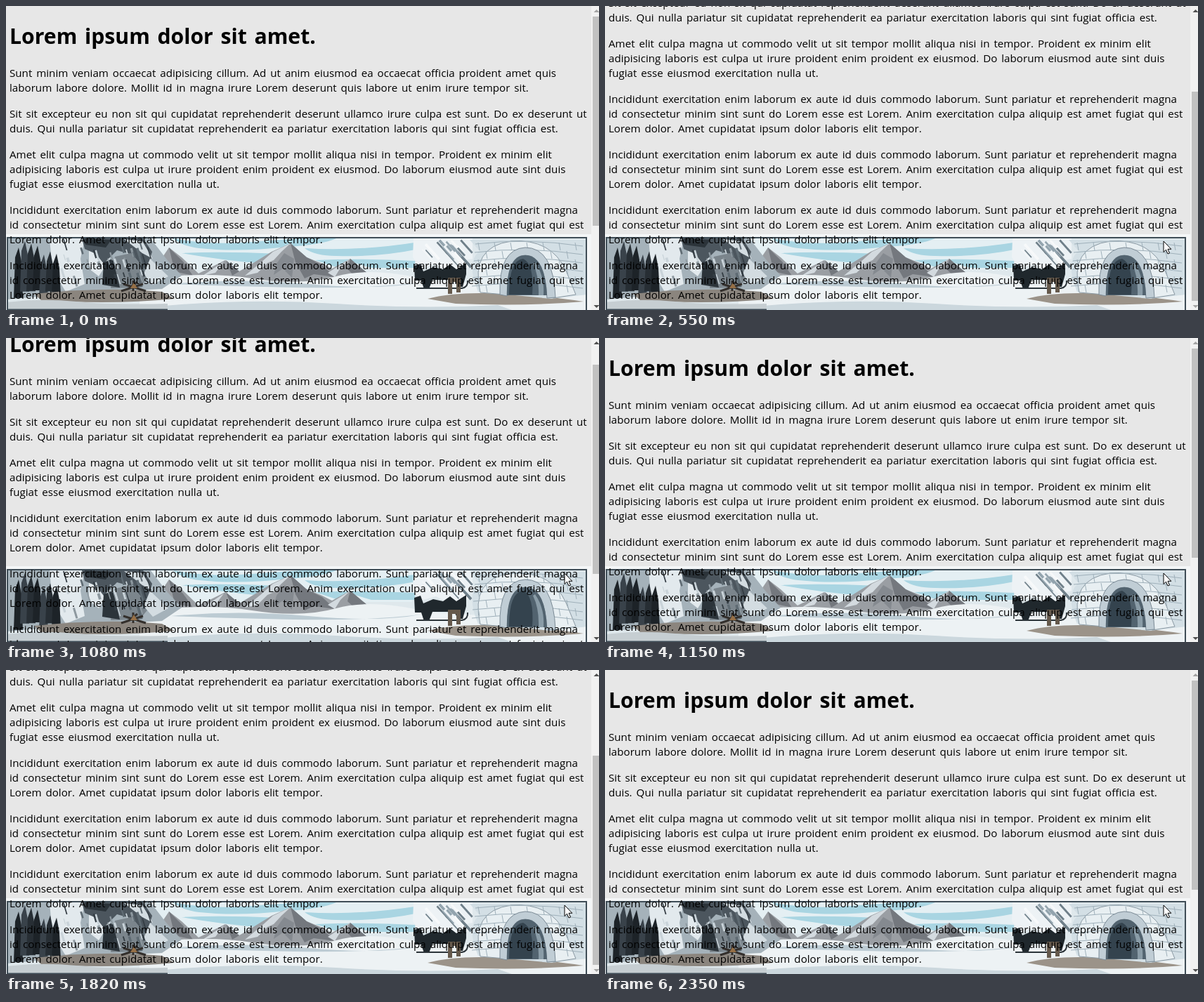
Write an HTML page that moves like this. It is 844 by 433 pixels and loops after 2620 ms.

```html
<!DOCTYPE html>
<html lang="la">
<head>
<meta charset="utf-8">
<title>Scrolling page</title>
<style>
html, body { margin: 0; width: 100%; height: 100%; overflow: hidden; background: #e7e7e7; }
#stage { position: relative; width: 844px; height: 433px; overflow: hidden; }
#stage > * { position: absolute; }
#scene { left: 0; top: 325px; }
#page { left: 5px; top: 0; color: #000; white-space: nowrap; }
h1 { margin: 21px 0; font: bold 30.2px/43px "Open Sans", sans-serif; word-spacing: 2.8px; }
p { margin: 0 0 16px; font: 15.15px/21px "Open Sans", sans-serif; word-spacing: 2px; }
#bar { left: 833px; top: 0; width: 11px; height: 433px; background: #f1f1f1; }
#thumb { left: 835px; top: 15px; width: 9px; height: 298px; background: #c1c1c1; }
#arrows { left: 833px; top: 0; }
#cursor { left: 794px; top: 334px; }
</style>
</head>
<body>
<div id="stage">
  <svg id="scene" width="833" height="108" viewBox="0 325 833 108">
    <path fill="#f4f6f7" d="M0 325H833V433H0Z"/>
    <path fill="#dfe8ec" d="M1 329H827V433H1Z"/>
    <!-- sky -->
    <path fill="#e4eff3" d="M205 330H590L578 376H230Z"/>
    <g fill="#a9d5e2">
      <path d="M238 331Q290 341 350 336L420 331H470Q450 340 400 343Q330 351 275 345Q250 342 238 331Z"/>
      <path d="M425 345Q500 350 588 336V346Q530 358 470 356Q440 356 425 345Z"/>
      <path d="M250 352Q310 349 385 353L365 367Q300 361 250 352Z"/>
      <path d="M440 362Q510 359 582 363V373H520L490 364L470 372Z"/>
    </g>
    <!-- mountains -->
    <path fill="#9a9ea3" d="M205 384L232 344L250 358L274 381L312 362L332 378L352 366L378 350L405 338L428 358L448 366L464 374L490 360L522 388L560 398H205Z"/>
    <path fill="#74787e" d="M405 338L428 358L450 369L468 386L438 382L425 388L412 365ZM490 360L526 390L500 388L486 375ZM313 362L332 378L322 384ZM232 344L252 364L266 384L240 378Z"/>
    <path fill="#d3dadf" d="M405 338L392 350L381 362L372 366L358 380L340 384L362 366L380 350ZM490 360L476 373L468 386L458 380ZM310 364L298 380L280 384Z"/>
    <path fill="#858a90" d="M396 352L385 367L381 383L394 374L407 387L410 360Z"/>
    <!-- ground -->
    <path fill="#edf2f4" d="M190 390Q280 377 350 388T470 385T600 390L720 398L827 404V433H190Z"/>
    <path fill="#bccbd3" d="M235 396Q330 387 430 396T590 394Q510 403 410 401T235 396Z"/>
    <path fill="#cbd7dd" d="M225 427Q350 416 470 424T700 426L720 433H225Z"/>
    <path fill="#9b9389" d="M600 417Q640 406 710 410T822 421Q740 428 640 424Z"/>
    <!-- cliffs and cave -->
    <path fill="#a5b2ba" d="M1 330H205L228 360L250 384L222 403L90 410L1 418Z"/>
    <path fill="#e2e9ed" d="M62 331H112L106 360L112 396L85 407L66 376ZM118 345L142 335L148 360L132 385L118 374Z"/>
    <path fill="#4c565e" d="M108 331H195L208 350L200 378L180 354L158 348L139 367L128 353L112 346Z"/>
    <path fill="#7b858c" d="M155 357L178 352L205 383L190 401L149 402Z"/>
    <path fill="#d3dce1" d="M168 332L194 335L209 360L194 352ZM205 360L231 385L209 397L196 382Z"/>
    <path fill="#2c343a" d="M112 331L150 333L142 344L113 340ZM139 365L152 360L162 401L137 397Z"/>
    <g id="cliffs"></g>
    <g id="spikes"></g>
    <path fill="#8b857e" d="M40 410Q145 399 222 407L240 417Q150 426 50 419Z"/>
    <path fill="#c6ced2" d="M1 422Q50 416 100 421T230 424V433H1Z"/>
    <path fill="none" stroke="#332f2c" stroke-width="3" d="M164 406L195 396M167 396L199 406M181 391V406M174 403L187 393"/>
    <path fill="#967047" d="M177 402L182 394L187 402Z"/>
    <!-- snowy tree and sled -->
    <path fill="#edf2f5" d="M580 331H664V360L644 364L658 372L630 378L612 368L590 374L579 358Z"/>
    <g id="branches"></g>
    <path fill="#20282d" d="M581 370L590 367L594 378L608 372L622 375L632 368L641 375L655 366V382L650 400H643L638 390H607L602 403H595L591 391L582 391Z"/>
    <path fill="none" stroke="#2c3439" stroke-width="2" d="M584 402H649Q658 400 657 391"/>
    <path fill="#65594c" d="M629 387H647V408H641V393H635V410H629Z"/>
    <!-- igloo -->
    <path fill="#d3dfe5" d="M660 333H827V411L776 417L672 407Q654 365 674 349Z"/>
    <path fill="#e8eff2" stroke="#8998a2" d="M675 408Q660 343 719 335Q776 331 797 377L811 411L779 416L768 371Q747 339 719 363L710 411Z"/>
    <g id="bricks" fill="none" stroke="#9fb0ba"></g>
    <path fill="#c0cdd5" stroke="#7c8b96" d="M703 411Q701 346 739 344Q779 344 782 415L770 416Q767 355 739 355Q714 355 713 413Z"/>
    <path fill="#52636f" d="M713 412Q712 355 739 355Q767 355 770 412Z"/>
    <path fill="#34434e" d="M716 411Q716 362 736 360Q752 367 749 411Z"/>
    <path fill="#8a9ca7" d="M753 365Q767 385 765 412H758Q759 385 750 367Z"/>
    <path fill="none" stroke="#3f4d57" stroke-width="2" d="M2 433V330H826V433M1 432.5H230"/>
  </svg>

  <div id="page">
    <h1>Lorem ipsum dolor sit amet.</h1>
    <p>Sunt minim veniam occaecat adipisicing cillum. Ad ut anim eiusmod ea occaecat officia proident amet quis<br>laborum labore dolore. Mollit id in magna irure Lorem deserunt quis labore ut enim irure tempor sit.</p>
    <p>Sit sit excepteur eu non sit qui cupidatat reprehenderit deserunt ullamco irure culpa est sunt. Do ex deserunt ut<br>duis. Qui nulla pariatur sit cupidatat reprehenderit ea pariatur exercitation laboris qui sint fugiat officia est.</p>
    <p>Amet elit culpa magna ut commodo velit ut sit tempor mollit aliqua nisi in tempor. Proident ex minim elit<br>adipisicing laboris est culpa ut irure proident enim proident ex eiusmod. Do laborum eiusmod aute sint duis<br>fugiat esse eiusmod exercitation nulla ut.</p>
  </div>

  <div id="bar"></div>
  <div id="thumb"></div>
  <svg id="arrows" width="11" height="433">
    <path id="up" d="M3.5 9L7.5 5L11.5 9Z"/>
    <path id="down" d="M3.5 426L7.5 430L11.5 426Z"/>
  </svg>
  <svg id="cursor" width="14" height="21">
    <path fill="#fff" stroke="#000" d="M1 1V16.5L4.5 13.2L7 19L9.5 18L7 12.3H11.8Z"/>
  </svg>
</div>
<script>
const $ = id => document.getElementById(id);
const LOOP = 2620, MAX = 158;

// Scroll position held from each time on
const STEPS = [
  [0, 0], [70, 18], [150, 70], [230, 118], [310, 144], [390, 154], [470, 157], [550, MAX],
  [950, 157], [1010, 110], [1080, 34], [1150, 0],
  [1690, 44], [1750, 128], [1820, MAX],
  [2150, 152], [2220, 92], [2280, 24], [2350, 0]
];

const repeated = `<p>Incididunt exercitation enim laborum ex aute id duis commodo laborum. Sunt pariatur et reprehenderit magna<br>
id consectetur minim sint sunt do Lorem esse est Lorem. Anim exercitation culpa aliquip est amet fugiat qui est<br>
Lorem dolor. Amet cupidatat ipsum dolor laboris elit tempor.</p>`;
$("page").insertAdjacentHTML("beforeend", repeated.repeat(4));

let seed = 7;
const random = () => (seed = seed * 16807 % 2147483647) / 2147483647;

// Seeded brush strokes inside a box, leaning by the given slope
function brush(id, count, left, top, width, height, slope, colors) {
  let strokes = "";
  for (let i = 0; i < count; i++) {
    const x = left + random() * width, y = top + random() * height, length = 6 + random() * 16;
    strokes += `<path stroke="${colors[i % colors.length]}" stroke-width="${1 + random() * 3}"
      d="M${x} ${y}l${slope * length} ${length}"/>`;
  }
  $(id).innerHTML = strokes;
}
brush("cliffs", 34, 72, 332, 130, 54, .3, ["#5f6b73", "#c9d3d9", "#343d44", "#8d989f"]);
brush("branches", 18, 584, 333, 66, 20, .9, ["#93a4ae", "#f7f9fa", "#6f7f89"]);

// Dark standing rocks on the left
let spikes = "";
for (let i = 0; i < 7; i++) {
  const x = 11 + i * 9, top = 331 + random() * 18 + i * 3, foot = 405 + random() * 12;
  const shade = ["#1d2328", "#39424a", "#272e34"][i % 3];
  spikes += `<path fill="${shade}" d="M${x} ${foot}L${x + 2} ${top + 14}L${x + 7} ${top}L${x + 11} ${top + 20}L${x + 13} ${foot}Z"/>`;
}
$("spikes").innerHTML = spikes;

// Ice blocks around the igloo door
let bricks = "";
for (let row = 0; row < 6; row++) {
  const y = 339 + row * 12;
  bricks += `M${668 - row} ${y}Q740 ${y - 9} 821 ${y + 3}`;
  for (let x = 672 + row % 2 * 11; x < 820; x += 23) bricks += `M${x} ${y - 2}l2 11`;
}
$("bricks").innerHTML = `<path d="${bricks}"/>`;

function draw(now) {
  const t = now % LOOP;
  const y = STEPS.findLast(step => step[0] <= t)[1];
  $("page").style.transform = `translateY(${-y}px)`;
  $("thumb").style.transform = `translateY(${Math.round(y * 107 / MAX)}px)`;
  $("up").setAttribute("fill", y > 0 ? "#505050" : "#a3a3a3");
  $("down").setAttribute("fill", y < MAX ? "#505050" : "#a3a3a3");
  $("cursor").style.visibility = t < 310 ? "hidden" : "visible";
}

const start = performance.now();
function tick() {
  draw(performance.now() - start);
  requestAnimationFrame(tick);
}
tick();
</script>
</body>
</html>
```
